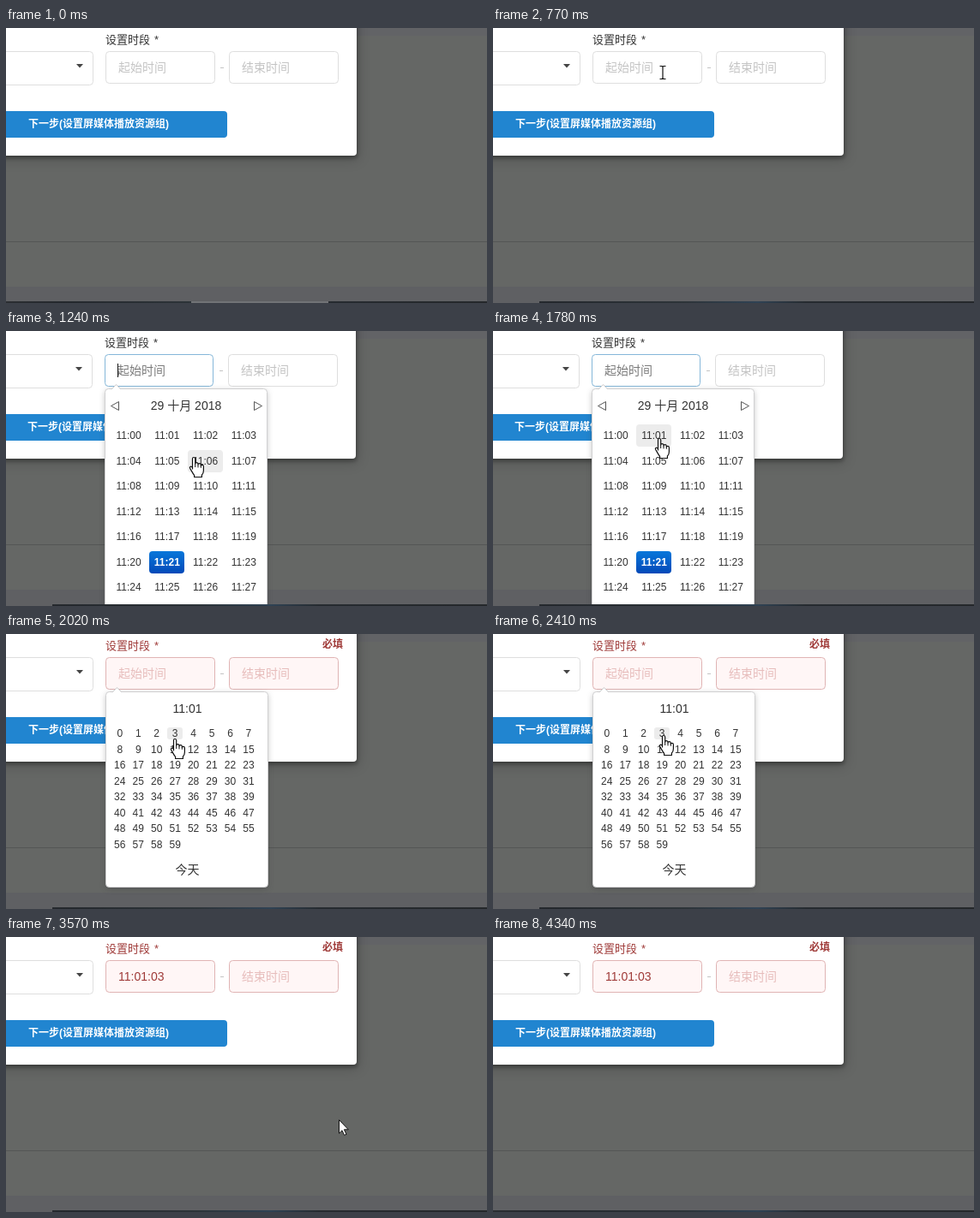
Write an HTML page that moves like this. It is 561 by 321 pixels and loops after 4430 ms.

```html
<!DOCTYPE html>
<html lang="zh-CN">
<head>
<meta charset="utf-8">
<title>设置时段</title>
<style>
  html, body { margin: 0; width: 100%; height: 100%; overflow: hidden; background: #656765; }
  svg { display: block; width: 561px; height: 321px; }
  text { font-family: "Liberation Sans", Arial, "Noto Sans CJK SC", "Noto Sans CJK", sans-serif; font-size: 14px; fill: #333; }
  .modal { filter: drop-shadow(1px 3px 2px rgba(0,0,0,.3)) drop-shadow(1px 3px 7px rgba(0,0,0,.22)); }
  .popup { filter: drop-shadow(0 2px 3px rgba(34,36,38,.25)); }
  .label { font-size: 13px; }
  .bold { font-size: 12px; font-weight: bold; }
  .cell text { font-size: 12px; text-anchor: middle; }
  .mid { text-anchor: middle; }
  .active text { font-weight: bold; fill: #fff; }
</style>
</head>
<body>
<svg viewBox="0 0 561 321" xmlns="http://www.w3.org/2000/svg">
  <defs>
    <linearGradient id="blue" x2="0" y2="1">
      <stop offset="0" stop-color="#0877da"/><stop offset="1" stop-color="#0349b8"/>
    </linearGradient>
    <linearGradient id="bar">
      <stop offset="0" stop-color="#2b2e32"/><stop offset=".12" stop-color="#24282d"/>
      <stop offset=".4" stop-color="#2d3439"/><stop offset=".55" stop-color="#2f4254"/>
      <stop offset=".65" stop-color="#262b30"/><stop offset="1" stop-color="#25282b"/>
    </linearGradient>
  </defs>

  <rect width="561" height="321" fill="#656765"/>
  <rect width="561" height="9" fill="#626366"/>
  <rect y="249" width="561" height="1" fill="#545655"/>
  <rect y="302" width="561" height="17" fill="#5f6063"/>

  <g id="modal">
    <rect class="modal" x="-20" y="-20" width="429" height="169" rx="4" fill="#fff"/>
    <text id="label" class="label" x="116" y="18">设置时段 <tspan x="173">*</tspan></text>
    <text id="need" class="bold" x="369" y="16" fill="#9f3a38" style="fill:#9f3a38">必填</text>
    <rect x="-20.5" y="27.5" width="122" height="39" rx="4" fill="#fff" stroke="#dedede"/>
    <path d="M82 42h8l-4 4.5z" fill="#444"/>
    <rect id="box1" x="116.5" y="27.5" width="127" height="37" rx="4"/>
    <rect id="box2" x="260.5" y="27.5" width="127" height="37" rx="4"/>
    <text id="text1" x="131" y="51"></text>
    <text id="text2" x="275" y="51">结束时间</text>
    <rect x="250" y="46" width="4" height="1" fill="#c4c4c4"/>
    <rect id="caret" x="131" y="38" width="1" height="16" fill="#111"/>
    <rect id="button" x="-20" y="97" width="278" height="31" rx="4"/>
    <text class="bold" x="26" y="116" style="fill:#fff">下一步(设置屏媒体播放资源组)</text>
  </g>

  <g id="popup"></g>

  <rect y="319" width="561" height="2" fill="url(#bar)"/>
  <rect id="task" y="319" height="2"/>

  <g id="cursor" stroke-linejoin="round">
    <path id="arrow" d="M.5 .5V16.2L4 12.8L6.6 18.4L9 17.3L6.4 11.8H11.3Z" fill="#fff" stroke="#111"/>
    <g id="beam">
      <path d="M-3.5 -7.5H-1L0 -6.7L1 -7.5H3.5M0 -6.7V6.7M-3.5 7.5H-1L0 6.7L1 7.5H3.5" fill="none" stroke="#fff" stroke-width="2.4" opacity=".6"/>
      <path d="M-3.5 -7.5H-1L0 -6.7L1 -7.5H3.5M0 -6.7V6.7M-3.5 7.5H-1L0 6.7L1 7.5H3.5" fill="none" stroke="#111" stroke-width="1.2"/>
    </g>
    <g id="hand">
      <path d="M-1.5 14V2Q-1.5 .5 0 .5T1.7 2V8Q1.7 6.6 3.2 6.6T5 8V9Q5 7.6 6.6 7.6T8.3 9.2V10.4Q8.3 9.3 9.8 9.3T11.4 11V16Q11.4 19 9.4 21V23.5H.6V21.3Q-1 19.4 -2.6 16.4L-4.4 13.2Q-5 11.6 -3.7 11.2Q-2.6 11 -1.5 12.6Z" fill="#fff" stroke="#111" stroke-width="1.2"/>
      <path d="M1.7 8V12M5 9V12.4M8.3 10.4V12.8" stroke="#111"/>
    </g>
  </g>
</svg>

<script>
const LOOP = 4430;
const OPEN = 850, MINUTES = 1080, SECONDS = 1860, PICKED = 2790;

// Bursts of screen updates: [first, last, count]
const BURSTS = [[0, 0, 1], [70, 530, 7], [680, 1150, 7], [1240, 1700, 7], [1780, 2100, 5],
  [2250, 2410, 3], [2790, 3260, 7], [3340, 3810, 7], [3880, 3960, 2], [4340, 4340, 1]];
const STEPS = BURSTS.flatMap(([a, b, n]) =>
  Array.from({ length: n }, (_, i) => Math.floor((n > 1 ? a + (b - a) * i / (n - 1) : a) / 10) * 10));

// Pointer path: [time, x, y]
const PATH = [[70, 403, 278], [530, 198, 52], [850, 198, 52], [1000, 272, 180], [1080, 268, 178],
  [1150, 219, 152], [1240, 219, 147], [1700, 194, 125], [1860, 194, 125], [2100, 199, 121],
  [2250, 199, 120], [2410, 199, 118], [2950, 199, 118], [3260, 253, 104], [3570, 388, 213],
  [3810, 496, 294], [3880, 517, 308]];
const GONE = 3960;

const $ = id => document.getElementById(id);
const pad = n => String(n).padStart(2, '0');
const set = (el, attrs) => { for (const k in attrs) el.setAttribute(k, attrs[k]); };
const show = (el, on) => { el.style.display = on ? '' : 'none'; };

const GRID = { cols: 4, x: 143, y: 122, dx: 44.8, dy: 29.55, w: 41, h: 26, r: 4 };
const FINE = { cols: 8, x: 132.8, y: 116, dx: 21.45, dy: 18.55, w: 18, h: 14, r: 3 };

const frame = (x, bottom) => `
  <rect class="popup" x="${x}.5" y="67.5" width="189" height="${bottom - 68}" rx="4" fill="#fff" stroke="#d0d0d1"/>
  <path d="M${x + 8} 68.2L${x + 13.5} 62.5L${x + 19} 68.2" fill="#fff" stroke="#c9c9ca"/>
  <rect x="${x + 8}" y="68" width="12" height="3" fill="#fff"/>`;

const dateHead = `<text class="mid" x="210" y="92">29 十月 2018</text>
  <path d="M131.5 82.5V92.5L122.5 87.5ZM289.5 82.5V92.5L298.5 87.5Z" fill="none" stroke="#555"/>`;

function makeView(grid, labels, active, decor) {
  const el = document.createElementNS('http://www.w3.org/2000/svg', 'g');
  const cells = labels.map((label, i) => ({
    label, x: grid.x + i % grid.cols * grid.dx, y: grid.y + Math.floor(i / grid.cols) * grid.dy
  }));
  el.innerHTML = decor + cells.map(({ label, x, y }, i) => `
    <g class="cell${i === active ? ' active' : ''}">
      <rect x="${Math.round(x - grid.w / 2)}" y="${Math.round(y - grid.h / 2)}" width="${grid.w}" height="${grid.h}" rx="${grid.r}"
        fill="${i === active ? 'url(#blue)' : 'none'}"/>
      <text x="${x}" y="${y + 4}">${label}</text>
    </g>`).join('');
  $('popup').append(el);
  const rects = [...el.querySelectorAll('.cell rect')];
  const hover = p => rects.forEach((rect, i) => {
    if (i === active) return;
    const c = cells[i];
    const over = Math.abs(p.x - c.x) < grid.w / 2 && Math.abs(p.y - c.y) < grid.h / 2;
    rect.setAttribute('fill', over ? '#ececec' : 'none');
  });
  return { el, hover };
}

const range = (n, f) => Array.from({ length: n }, (_, i) => f(i));
const hours = makeView(GRID, range(24, i => pad(i) + ':00'), 11,
  frame(115, 319) + dateHead + '<text class="mid" x="210" y="304">今天</text>');
const minutes = makeView(GRID, range(28, i => '11:' + pad(i)), 21, frame(115, 340) + dateHead);
const seconds = makeView(FINE, range(60, String), -1, frame(116, 296) +
  '<text class="mid" x="211.5" y="92">11:01</text><text class="mid" x="211.5" y="280">今天</text>');
const views = [hours, minutes, seconds];

function pointerAt(t) {
  if (t < PATH[0][0] || t >= GONE) return { x: -99, y: -99 };
  const i = PATH.findIndex(k => k[0] > t);
  if (i < 0) return { x: PATH.at(-1)[1], y: PATH.at(-1)[2] };
  const [t0, x0, y0] = PATH[i - 1], [t1, x1, y1] = PATH[i];
  const f = (t - t0) / (t1 - t0);
  return { x: Math.round(x0 + (x1 - x0) * f), y: Math.round(y0 + (y1 - y0) * f) };
}

const inside = (p, x0, y0, x1, y1) => p.x >= x0 && p.x < x1 && p.y >= y0 && p.y < y1;

function drawFields(t) {
  const focus = t >= OPEN && t < SECONDS;
  const error = t >= SECONDS;
  const normal = { fill: '#fff', stroke: '#dedede' };
  const wrong = { fill: '#fff6f6', stroke: '#e0b4b4' };
  $('modal').setAttribute('transform', `translate(${focus ? -1 : 0} 0)`);
  set($('box1'), error ? wrong : focus ? { fill: '#fff', stroke: '#85b7d9' } : normal);
  set($('box1'), { width: focus ? 126 : 127 });
  set($('box2'), error ? wrong : normal);
  $('text1').textContent = t >= PICKED ? '11:01:03' : '起始时间';
  $('text1').style.fill = t >= PICKED ? '#9f3a38' : error ? '#e7bdbc' : focus ? '#7b7b7b' : '#c4c4c4';
  $('text2').style.fill = error ? '#e7bdbc' : '#c4c4c4';
  $('label').style.fill = error ? '#9f3a38' : '#333';
  show($('need'), error);
  show($('caret'), t >= OPEN && t < 1700);
}

function drawPopup(t, p) {
  const fade = Math.min((t - 800) / 120, (2950 - t) / 200, 1);
  const open = fade > 0;
  show($('popup'), open);
  $('popup').style.opacity = Math.max(fade, 0);
  const current = t < MINUTES ? hours : t < SECONDS ? minutes : seconds;
  views.forEach(v => show(v.el, v === current));
  current.hover(p);
  return open;
}

function drawPointer(p, open) {
  const onPopup = open && inside(p, 116, 67, 306, 319);
  const onButton = !onPopup && inside(p, 0, 97, 258, 128);
  const onField = inside(p, 116, 27, 244, 65);
  $('button').setAttribute('fill', onButton ? '#1a7dc8' : '#2185d0');
  show($('hand'), onPopup || onButton);
  show($('beam'), onField);
  show($('arrow'), !onPopup && !onButton && !onField);
  $('cursor').setAttribute('transform', `translate(${p.x} ${p.y})`);
}

function drawTask(t) {
  const lit = t < 680 ? [216, 160, '#717376'] : [0, t < 4340 ? 54 : 0, '#5f6063'];
  set($('task'), { x: lit[0], width: lit[1], fill: lit[2] });
}

function render(time) {
  const t = STEPS.findLast(s => s <= time);
  const p = pointerAt(t);
  drawFields(t);
  drawPointer(p, drawPopup(t, p));
  drawTask(t);
}

const start = performance.now();
function tick() {
  render((performance.now() - start) % LOOP);
  requestAnimationFrame(tick);
}
tick();
</script>
</body>
</html>
```
